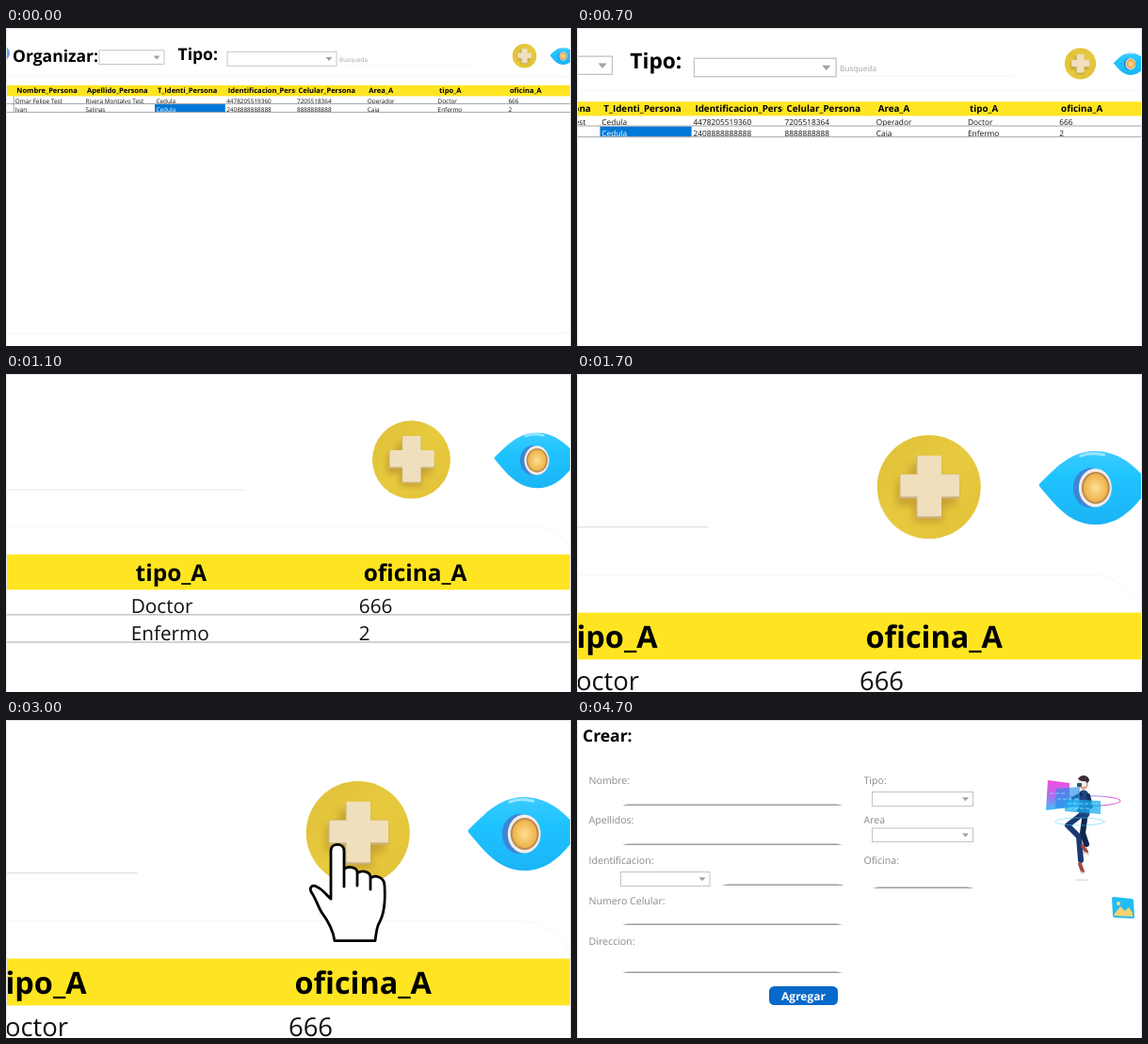
An HTML page for the animation above (4.8 s loop, 600 by 338 pixels).

```html
<!DOCTYPE html>
<html lang="es">
<head>
<meta charset="utf-8">
<style>
  html, body { margin: 0; width: 100%; height: 100%; overflow: hidden; background: #fff; }
  svg { display: block; font-family: "Open Sans", "Noto Sans", sans-serif; text-rendering: geometricPrecision; }
  .title { font-weight: 700; font-size: 17.5px; }
  .head { font-weight: 700; font-size: 7.55px; }
  .cell { font-size: 6.4px; fill: #111; }
  .label { font-size: 10.6px; fill: #8a8a8a; }
  .combo { fill: #fff; stroke: #c4c4c4; }
  .thin { fill: none; vector-effect: non-scaling-stroke; }
</style>
</head>
<body>
<svg id="stage" width="600" height="338" viewBox="0 0 600 338">
  <defs>
    <linearGradient id="line" x2="0" y2="1"><stop stop-color="#ddd"/><stop offset="1" stop-color="#8c8c8c"/></linearGradient>
    <linearGradient id="coin" x2="1" y2="1"><stop stop-color="#dfc03a"/><stop offset=".5" stop-color="#e7ca3e"/><stop offset="1" stop-color="#e2c038"/></linearGradient>
    <linearGradient id="sky" x2="0" y2="1"><stop stop-color="#3bcbff"/><stop offset=".35" stop-color="#1fc4ff"/><stop offset="1" stop-color="#1ab4f5"/></linearGradient>
    <radialGradient id="iris"><stop stop-color="#ffdf94"/><stop offset="1" stop-color="#ecae42"/></radialGradient>
    <linearGradient id="panel" x2="0" y2="1"><stop stop-color="#f436dc"/><stop offset=".45" stop-color="#b34ee8"/><stop offset="1" stop-color="#21b8f5"/></linearGradient>
    <linearGradient id="ring"><stop stop-color="#35cdf5"/><stop offset="1" stop-color="#f06ad8"/></linearGradient>
    <filter id="soft"><feGaussianBlur stdDeviation="4"/></filter>
  </defs>

  <svg id="list" width="600" height="338" viewBox="0 0 600 338">
    <rect class="thin" x="-10" y="51.5" width="613.8" height="273" rx="13" stroke="#f7f7f7"/>
    <circle cx="-5" cy="27" r="9" fill="#6ea6ee"/>
    <text class="title" x="7" y="35.5">Organizar:</text>
    <text class="title" x="182.5" y="33.7">Tipo:</text>
    <text x="354" y="35.7" font-size="6.4" fill="#a6a6a6">Busqueda</text>
    <path d="M354 39.6H496" stroke="#e0e0e0" stroke-width=".25"/>
    <g id="filters"></g>
    <rect y="60.8" width="606" height="11.6" fill="#ffe521"/>
    <g id="table"></g>
    <path class="thin" d="M0 80.6H606M0 89.6H606M8.3 72.4V89.6" stroke="#a4a4a4"/>

    <g transform="translate(463.4 1.7) scale(.2331)">
      <circle cx="374" cy="120" r="55" fill="url(#coin)"/>
      <path d="M354 96H384V112H402V140H389V157H358V140H340V112H354Z" fill="#b8922b" opacity=".7" filter="url(#soft)"/>
      <path id="cross" d="M362 89H386V108H405V131H386V152H362V131H344V108H362Z" fill="#cdb27d" stroke="#cdb27d" stroke-width="3" stroke-linejoin="round"/>
      <path d="M363 88H386V108H405V129H386V150H363V129H345V108H363Z" fill="#efdfbd" stroke="#efdfbd" stroke-width="2.5" stroke-linejoin="round"/>
      <path d="M491 117C507 101 524 82 550 82C577 82 594 99 610 118C594 140 578 160 551 160C523 160 508 139 491 119Z" fill="url(#sky)"/>
      <path d="M535 87C542 84 552 84 560 86" fill="none" stroke="#9be6ff" stroke-width="3" stroke-linecap="round"/>
      <ellipse cx="545" cy="121" rx="18" ry="21" fill="#3d86d6"/>
      <ellipse cx="550.5" cy="121" rx="17.5" ry="20.5" fill="#f2ece6"/>
      <ellipse cx="551" cy="121" rx="14" ry="16" fill="url(#iris)" stroke="#b98a5a" stroke-width="2"/>
    </g>
  </svg>

  <path id="hand" fill="#fff" stroke="#000" stroke-width="2.8" stroke-linejoin="round" stroke-linecap="round"
    d="M349 235.5C347 222 341 213 335 205C331 198 329 191 325 185C321 179 325 175 330 178C337 181 340 187 345 191V140C345 131 359 131 359 140V178V160C361 156 373 156 373 163V177V164C376 160 387 161 387 168V181V169C391 165 402 167 402 177C403 193 402 207 396 217C393 223 393 230 392 235.5Z"/>

  <g id="form">
    <rect width="600" height="338" fill="#fff"/>
    <text class="title" x="6" y="22.7">Crear:</text>
    <g id="fields"></g>
    <rect x="204" y="283" width="73" height="20" rx="5.5" fill="#0769c9"/>
    <text x="240.5" y="297.6" text-anchor="middle" font-size="12" font-weight="700" fill="#fff">Agregar</text>

    <ellipse cx="536" cy="170" rx="8" ry="1.3" fill="#e9e9e9"/>
    <g fill="none" stroke-linecap="round" stroke-linejoin="round">
      <ellipse cx="541" cy="86" rx="36" ry="5.5" stroke="url(#ring)" stroke-width="1.2"/>
      <path d="M539 98L521 112L533 124L535 149" stroke="#183a70" stroke-width="6"/>
      <path d="M540 98L537 120L541 132" stroke="#10264f" stroke-width="6"/>
      <path d="M538 80L539 99" stroke="#1d4583" stroke-width="11"/>
      <path d="M543 80L546 92L533 96M535 79L526 84" stroke="#122d5d" stroke-width="4"/>
      <path d="M537 134L541 140M534 153L537 161" stroke="#a5483f" stroke-width="4"/>
      <path d="M539 141L543 143M535 162L538 163" stroke="#e8d6d0" stroke-width="2"/>
      <ellipse cx="534" cy="108" rx="26" ry="4" stroke="#55cdf3" stroke-width=".8" opacity=".65"/>
    </g>
    <ellipse cx="538" cy="67" rx="5" ry="7" fill="#dca18a"/>
    <path d="M532 63C534 57 544 58 544 65L541 67Z" fill="#3b2b35"/>
    <rect x="531" y="65" width="10" height="6" rx="2" fill="#e5edf5"/>
    <rect x="531" y="67" width="5" height="4" rx="1" fill="#30506c"/>
    <path d="M500 64L523 67V93L498 96Z" fill="url(#panel)" opacity=".88"/>
    <path d="M509 73L534 71V92L508 94Z" fill="#238fe8" opacity=".65"/>
    <path d="M518 84L556 86V100L518 97Z" fill="#18aef0" opacity=".75"/>
    <path d="M502 78H520M510 84H531M521 89H552M522 94H545" stroke="#89e5ff" stroke-width=".8" stroke-dasharray="4 2"/>

    <path d="M570 188L589 190Q591 190 591 192L592 209Q592 211 590 211L571 210Q569 210 569 208L568 190Q568 188 570 188Z" fill="#22bdf4"/>
    <path d="M570 207L577 198L582 203L586 199L590 205V209L571 208Z" fill="#f4d36f"/>
    <circle cx="575" cy="195" r="2" fill="#ffe083"/>
    <path d="M599 3h1v2h-1zM599 12h1v2h-1z" fill="#333"/>
  </g>
  <path d="M.5 338V.5H599.5V338" fill="none" stroke="#e6e6e6"/>
</svg>

<script>
const LOOP = 4800, STEP = 100;
const byId = id => document.getElementById(id);
const clamp = v => Math.min(1, Math.max(0, v));

const combo = (x, y, w, h) => {
  const ax = x + w - 8, ay = y + h / 2;
  return `<rect class="combo" x="${x}" y="${y}" width="${w}" height="${h}"/>
    <path d="M${ax - 3.5} ${ay - 1.7}h7l-3.5 4z" fill="#a2a2a2"/>`;
};
const underline = (x1, x2, y) =>
  `<path d="M${x1} ${y + 1}L${x1 + 7} ${y - 1}H${x2 - 7}L${x2} ${y + 1}Z" fill="url(#line)"/>`;
const label = (text, x, y) => `<text class="label" x="${x}" y="${y}">${text}</text>`;

const COLUMN = 74.8;
// Each cell is a nested svg, so that long text is clipped to its column.
const row = (cells, y, h, baseline, css, pad) => cells.map((text, i) =>
  `<svg x="${8.2 + COLUMN * i}" y="${y}" width="${COLUMN}" height="${h}">
    <text class="${css}" x="${pad}" y="${baseline - y}">${text}</text></svg>`).join("");

byId("filters").innerHTML = combo(99, 23.7, 69, 14.8) + combo(235, 25.3, 116, 15);

byId("table").innerHTML =
  row(["Nombre_Persona", "Apellido_Persona", "T_Identi_Persona", "Identificacion_Persona",
       "Celular_Persona", "Area_A", "tipo_A", "oficina_A"], 60.8, 11.6, 69.4, "head", 3.1) +
  row(["Omar Felipe Test", "Rivera Montalvo Test", "Cedula", "4478205519360",
       "7205518364", "Operador", "Doctor", "666"], 72.4, 8.6, 79.9, "cell", 1.6) +
  `<rect x="158" y="81" width="${COLUMN}" height="8.6" fill="#0078d7"/>` +
  row(["Ivan", "Salinas", '<tspan fill="#fff">Cedula</tspan>', "2408888888888",
       "8888888888", "Caja", "Enfermo", "2"], 81, 8.5, 88.9, "cell", 1.6);

byId("fields").innerHTML =
  ["Nombre:", "Apellidos:", "Identificacion:", "Numero Celular:", "Direccion:"]
    .map((text, i) => label(text, 12.5, 67.7 + 42.7 * i)).join("") +
  ["Tipo:", "Area", "Oficina:"].map((text, i) => label(text, 304.5, 67.7 + 42.5 * i)).join("") +
  [90, 132, 217, 268].map(y => underline(48, 282, y)).join("") +
  underline(154, 284, 175) + underline(314, 421, 178) +
  combo(313.5, 76.5, 107, 15) + combo(313.5, 115, 107, 14.5) + combo(46.5, 161.5, 94.5, 15);

function draw(now) {
  const t = Math.floor(now / STEP) * STEP % LOOP;

  // The visible window shrinks at a steady rate towards the top right.
  const zoom = clamp((t - 500) / 666), size = 1 - .767 * zoom;
  byId("list").setAttribute("viewBox", `${463.5 * zoom} ${1.7 * zoom} ${600 * size} ${338 * size}`);

  const rise = 1 - (1 - clamp((t - 1900) / 500)) ** 3;
  byId("hand").setAttribute("transform", `translate(0 ${210 * (1 - rise) - .8})`);

  byId("form").style.display = t >= 3300 ? "" : "none";
  requestAnimationFrame(draw);
}
draw(performance.now());
</script>
</body>
</html>
```
